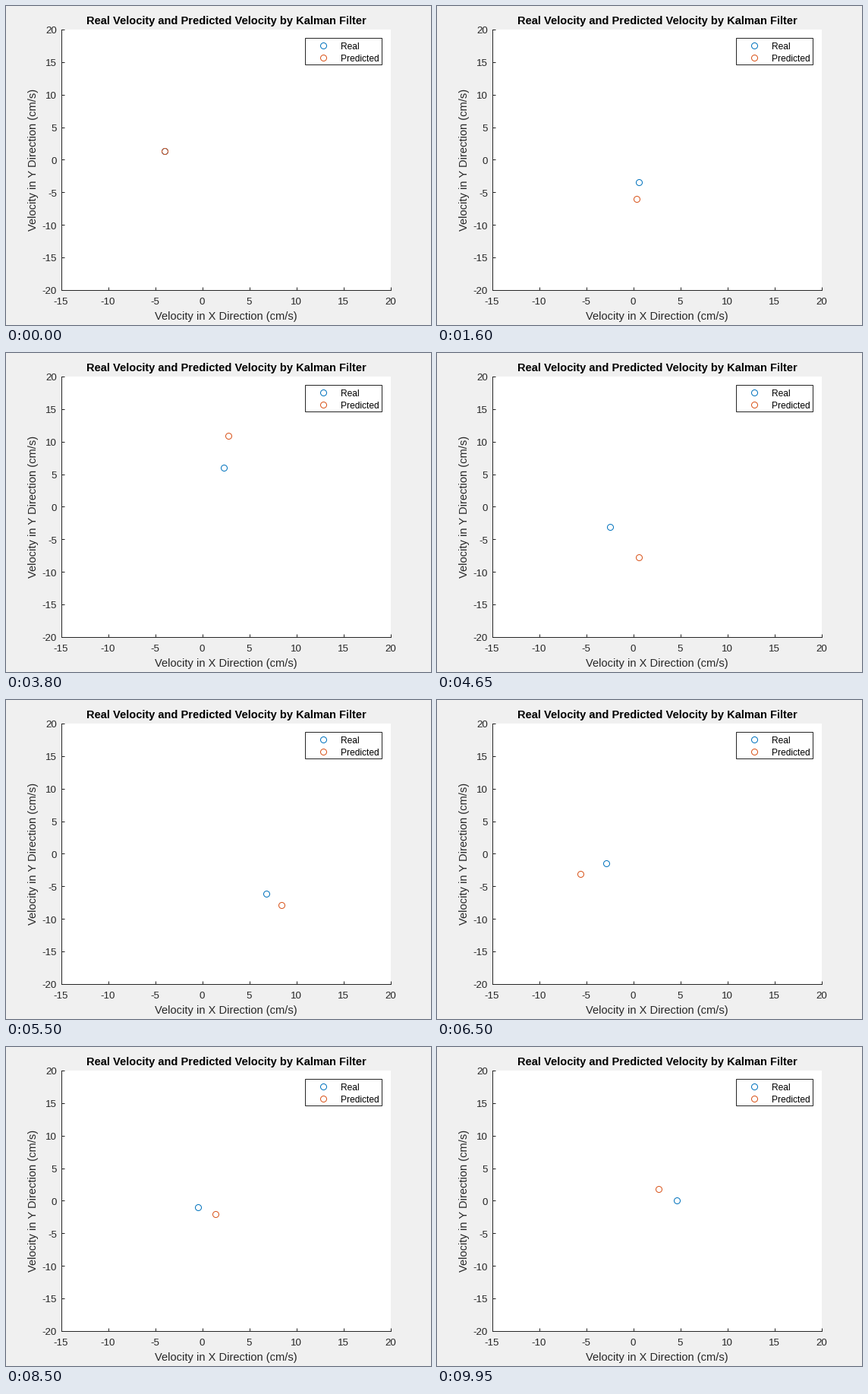
Recreate the animation shown at these times as a matplotlib script. Size 560 by 420 pixels, loop 10000 ms.

```python
import numpy as np
import matplotlib.pyplot as plt
from matplotlib.animation import FuncAnimation
from matplotlib.patches import Rectangle

W, H, DPI = 560, 420, 100
FRAMES, INTERVAL = 200, 50
PX = 72 / DPI                       # points per pixel
BLUE, ORANGE, DARK = "#0072BD", "#D95319", "#262626"
LEFT, RIGHT, TOP, BOTTOM = 72.8, 506.8, 31, 373.8

plt.rcParams["font.family"] = "Liberation Sans"

# Each hand stroke is a smooth velocity pulse: peak time (s), x and y strength
STROKES = [
    (0, -3.8, -1.4), (0.4, -13, 18), (1.8, -1, -10.65), (2.6, -14.3, 5),
    (3.25, 2.6, -13.1), (4.02, 2.9, 16.7), (4.4, -9, 2), (4.85, 6.2, -14.9),
    (5.6, 8.2, -9.8), (6.75, -13.2, -8.1), (7.75, 4.1, -14.9),
    (8.2, -4.8, 0), (8.75, 4.1, -6), (9.55, 9.5, -6.6), (10, 0.75, 1.5),
]
REST = 1.0          # velocity between strokes, both axes
HALF_WIDTH = 0.5    # seconds from the start of a pulse to its peak
FOLLOW = 0.35       # share of the gap the real velocity closes per frame


def pulse(t, peak):
    u = np.clip((t - peak) / HALF_WIDTH, -1, 1)
    return (1 + np.cos(np.pi * u)) / 2


seconds = np.arange(FRAMES) * INTERVAL / 1000
predicted = REST + sum(np.outer(pulse(seconds, peak), (vx, vy))
                       for peak, vx, vy in STROKES)
real = predicted.copy()
for i in range(1, FRAMES):
    real[i] = real[i - 1] + FOLLOW * (predicted[i] - real[i - 1])

fig = plt.figure(figsize=(W / DPI, H / DPI), dpi=DPI, facecolor="#F0F0F0")
ax = fig.add_axes([LEFT / W, 1 - BOTTOM / H, (RIGHT - LEFT) / W, (BOTTOM - TOP) / H])
ax.set(xlim=(-15, 20), ylim=(-20, 20),
       xticks=range(-15, 21, 5), yticks=range(-20, 21, 5))
ax.tick_params(direction="in", length=4 * PX, width=PX, color=DARK,
               labelbottom=False, labelleft=False)
for side, spine in ax.spines.items():
    spine.set(visible=side in ("left", "bottom"), color=DARK, linewidth=PX)

# Overlay measured in pixels from the top left
top = fig.add_axes([0, 0, 1, 1])
top.set(xlim=(0, W), ylim=(H, 0))
top.axis("off")


def put(x, y, text, size, color=DARK, **kw):
    kw = {"ha": "center", "va": "baseline", **kw}
    top.text(x, y, text, fontsize=size * PX, color=color, **kw)


def ring(axes, color, x, y):
    return axes.plot([x], [y], "o", ms=8 * PX, mfc="none", mec=color, mew=PX)[0]


put(290, 24, "Real Velocity and Predicted Velocity by Kalman Filter", 14.67,
    "black", weight="bold")
put(289.5, 413, "Velocity in X Direction (cm/s)", 14.67)
put(40, 202.5, "Velocity in Y Direction (cm/s)", 14.67, rotation=90,
    rotation_mode="anchor")
for v in range(-15, 21, 5):
    put(LEFT + (v + 15) / 35 * (RIGHT - LEFT) - 0.5, 393, str(v), 13.33)
for v in range(-20, 21, 5):
    put(67, BOTTOM - (v + 20) / 40 * (BOTTOM - TOP) + 5.5, str(v), 13.33, ha="right")

top.add_patch(Rectangle((394, 42), 101, 35, fc="white", ec=DARK, lw=PX))
for y, color, name in ((52, BLUE, "Real"), (68, ORANGE, "Predicted")):
    ring(top, color, 418, y)
    put(440.5, y + 5, name, 12, "black", ha="left")

real_dot = ring(ax, BLUE, *real[0])
pred_dot = ring(ax, ORANGE, *predicted[0])


def update(i):
    for dot, (x, y) in ((real_dot, real[i]), (pred_dot, predicted[i])):
        dot.set_data([x], [y])
    return real_dot, pred_dot


anim = FuncAnimation(fig, update, frames=FRAMES, interval=INTERVAL,
                     repeat=True, repeat_delay=0, blit=False)
plt.show()
```
